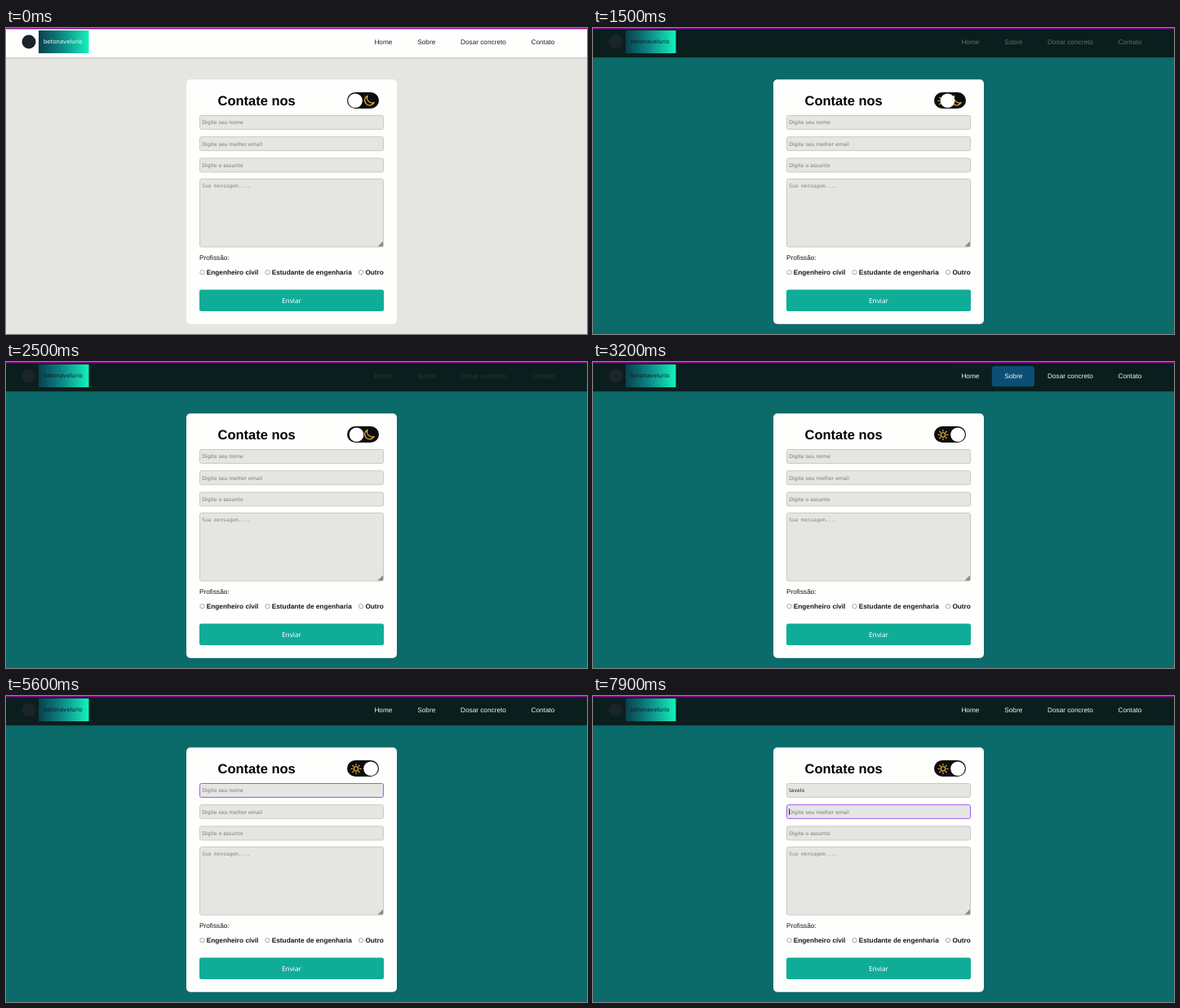
These frames come from a looping animation (712x376 px, 8 s). An HTML page:

```html
<!DOCTYPE html>
<html lang="pt">
<head>
<meta charset="utf-8">
<title>Contate nos</title>
<style>
  html, body { margin: 0; width: 100%; height: 100%; overflow: hidden; }
  svg { display: block; width: 712px; height: 376px; }
  text { font: 8.24px "Liberation Sans", Arial, sans-serif; fill: #161616; text-rendering: geometricPrecision; white-space: pre; }
  .bold { font-weight: bold; }
  .title { font-size: 16.48px; font-weight: bold; fill: #000; }
  .hint, .typed { font: 6.18px "DejaVu Sans", sans-serif; fill: #777; }
  .typed { fill: #222; }
  .mono { font: 6.18px "DejaVu Sans Mono", monospace; fill: #858585; }
  .send { font: 8.24px "Noto Sans", sans-serif; fill: #fff; text-anchor: middle; }
  .brand { font: 6.9px "DejaVu Sans", sans-serif; }
  .field { fill: #e5e6e2; stroke: #c9cac7; }
  .radio { fill: #fff; stroke: #858585; stroke-width: .7; }
  .icon { fill: none; stroke: #f0c040; stroke-width: 1.1; stroke-linecap: round; stroke-linejoin: round; }
</style>
</head>
<body>
<svg viewBox="0 0 712 376">
  <defs>
    <linearGradient id="teal">
      <stop offset="0" stop-color="#0a3f4e"/>
      <stop offset=".45" stop-color="#0d8583"/>
      <stop offset="1" stop-color="#13f3bd"/>
    </linearGradient>
  </defs>
  <rect id="page" width="712" height="376"/>
  <rect y="36" width="712" height="1" opacity=".1"/>
  <rect y="37" width="712" height="1.5" opacity=".04"/>
  <rect id="header" width="712" height="36"/>
  <rect width="712" height="1.4" fill="#8a0a8e"/>
  <circle cx="28" cy="17" r="8.5" fill="#1b2429"/>
  <rect x="40" y="3" width="61.5" height="28" fill="url(#teal)"/>
  <text id="brand" class="brand" x="46" y="19">betonavelurio</text>
  <g id="nav"></g>

  <rect x="221" y="63.3" width="258" height="300.5" rx="5" fill="#fefffd"/>
  <text class="title" x="259.6" y="94.6">Contate nos</text>
  <rect x="418" y="79" width="39" height="20" rx="10" fill="#0d0d0f"/>
  <g class="icon">
    <circle cx="429" cy="89.5" r="2.7"/>
    <path id="rays"/>
    <path d="M443 83.2A6.2 6.2 0 1 0 451.3 91.6A6.4 6.4 0 0 1 443 83.2Z"/>
  </g>
  <circle id="knob" cy="89.2" r="8.8" fill="#fff"/>

  <g id="fields"></g>
  <rect class="field" x="237.5" y="185.5" width="225" height="83.5" rx="2"/>
  <path d="M462 262v6.5h-6.5z" fill="#8c8c8a"/>
  <text class="mono" x="240.2" y="195.6">Sua mensagem....</text>
  <text class="typed" id="typed" x="240.2" y="118.3"></text>
  <rect id="caret" width=".8" height="8" fill="#111"/>

  <text x="237" y="285">Profissão:</text>
  <g id="radios"></g>
  <rect x="237" y="321.5" width="226" height="26.5" rx="2.5" fill="#0fad98"/>
  <text class="send" x="350" y="338">Enviar</text>
</svg>
<script>
const LOOP = 8000, STEP = 100;
const $ = id => document.getElementById(id);
const clamp = v => Math.min(1, Math.max(0, v));
const mix = (a, b, p) => a.map((v, i) => Math.round(v + (b[i] - v) * p));
const rgb = c => `rgb(${c})`;

// Standard CSS "ease" curve
function ease(x) {
  let lo = 0, hi = 1, s = .5;
  for (let i = 0; i < 20; i++) {
    s = (lo + hi) / 2;
    if (.75 * s * (1 - s) + s ** 3 < x) lo = s; else hi = s;
  }
  return .3 * s * (1 - s) ** 2 + 3 * s * s * (1 - s) + s ** 3;
}
const ramp = (t, start, length) => ease(clamp((t - start) / length));
const pulse = (t, from, to, length) => ramp(t, from, length) - ramp(t, to, length);

// label, text x, box width, hover start, hover end
const links = [
  ["Home", 451.4, 53, 2850, 3050],
  ["Sobre", 504.3, 52, 3050, 3250],
  ["Dosar concreto", 557, 87, 3250, 3480],
  ["Contato", 643.5, 60, 3480, 3750],
];
$("nav").innerHTML = links.map(([label, x, w]) =>
  `<rect x="${x - 15.5}" y="5" width="${w}" height="25.3" rx="3" fill="#0c5176"/><text x="${x}" y="20">${label}</text>`).join("");

// label, top, focus start, focus end
const fields = [
  ["Digite seu nome", 107, 4250, 7650],
  ["Digite seu melhor email", 133.2, 7650, 9000],
  ["Digite o assunto", 159.5, 9000, 9000],
];
$("fields").innerHTML = fields.map(([label, y]) =>
  `<rect class="field" x="237.5" y="${y + .5}" width="225" height="17" rx="2"/><text class="hint" x="240.2" y="${y + 11.3}">${label}</text>`).join("");

$("radios").innerHTML = [["Engenheiro cívil", 245.8], ["Estudante de engenharia", 325.8], ["Outro", 440.4]].map(([label, x]) =>
  `<circle class="radio" cx="${x - 5.3}" cy="300.2" r="2.7"/><text class="bold" x="${x}" y="302.8">${label}</text>`).join("");

$("rays").setAttribute("d", Array.from({ length: 8 }, (_, i) => {
  const c = Math.cos(i * Math.PI / 4), s = Math.sin(i * Math.PI / 4);
  return `M${429 + 4.5 * c} ${89.5 + 4.5 * s}L${429 + 6 * c} ${89.5 + 6 * s}`;
}).join(""));

const linkNodes = [...$("nav").children];
const fieldNodes = [...$("fields").children];
const name = "tavelo", keyTimes = [5700, 5800, 5900, 6100, 6300, 6400];
const clicks = [1415, 2065, 2465];

function draw(t) {
  const dark = clicks.filter(c => t >= c).length % 2 === 1;
  const on = clicks.reduce((sum, c, i) => sum + (i % 2 ? -1 : 1) * ramp(t, c, 385), 0);
  const headerColor = dark ? "#0b1e1e" : "#fefffd";
  $("page").setAttribute("fill", dark ? "#0b6b6a" : "#e5e6e2");
  $("header").setAttribute("fill", headerColor);
  $("brand").style.fill = headerColor;
  $("knob").setAttribute("cx", 428 + 19 * on);

  links.forEach(([, , , from, to], i) => {
    linkNodes[2 * i].setAttribute("opacity", pulse(t, from, to, 180));
    linkNodes[2 * i + 1].style.fill = rgb(mix([34, 34, 34], [245, 245, 245], on));
  });

  const typed = name.slice(0, keyTimes.filter(k => t >= k).length);
  $("typed").textContent = typed;
  fields.forEach(([, , from, to], i) => {
    fieldNodes[2 * i].style.stroke = rgb(mix([201, 202, 199], [168, 85, 240], pulse(t, from, to, 250)));
  });
  fieldNodes[1].style.display = typed ? "none" : "";

  const inEmail = t >= 7650;
  const caret = $("caret");
  caret.style.display = inEmail || (t >= 5650 && t < 6850) ? "" : "none";
  caret.setAttribute("x", 240.2 + (inEmail || !typed ? 0 : $("typed").getComputedTextLength() + .3));
  caret.setAttribute("y", inEmail ? 138.2 : 112);
}

function tick() {
  draw(Math.floor(performance.now() % LOOP / STEP) * STEP);
  requestAnimationFrame(tick);
}
tick();
</script>
</body>
</html>
```
